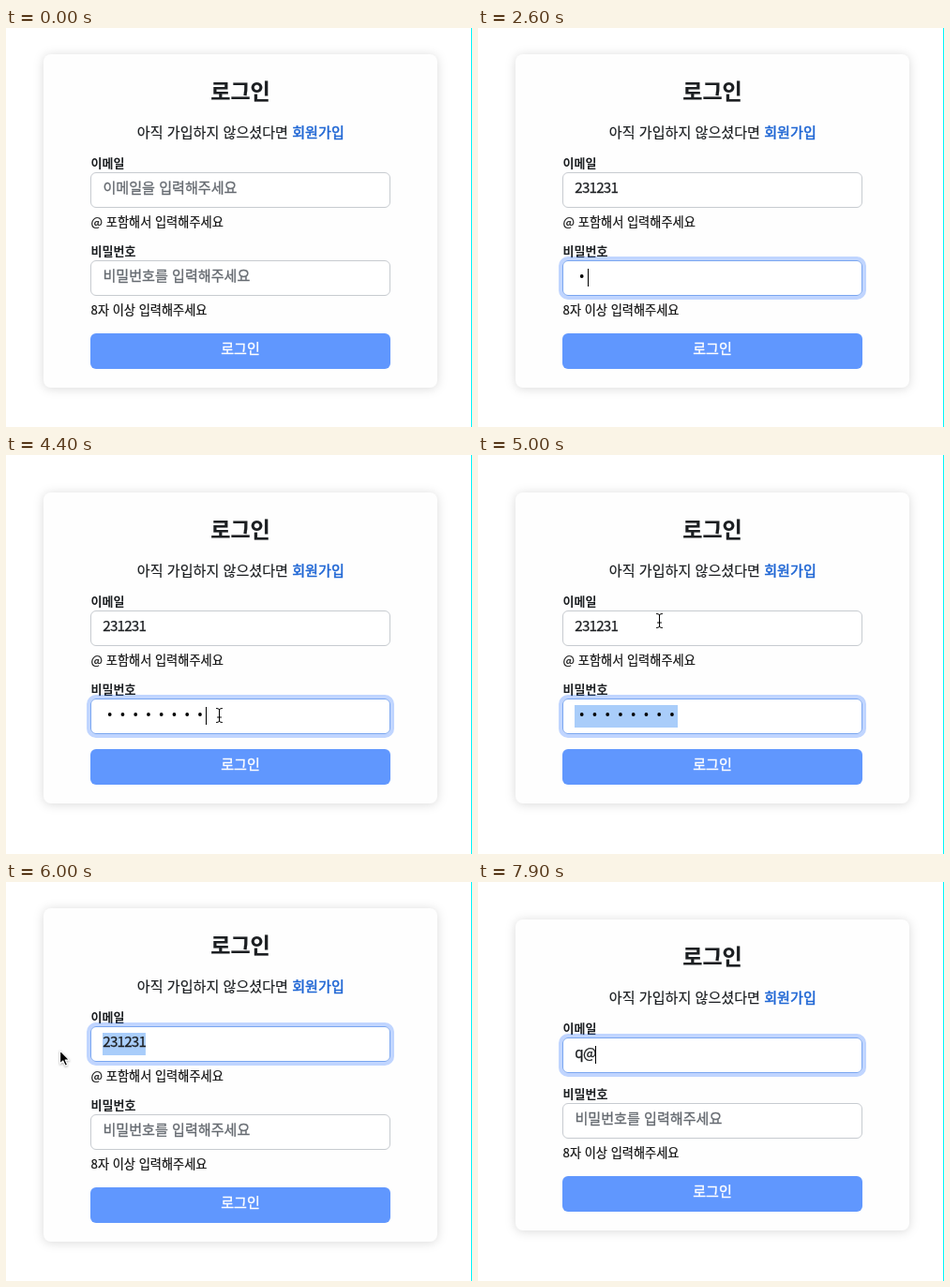
Recreate the animation shown at these times as an HTML page. Size 497x426 px, loop 8000 ms.

```html
<!DOCTYPE html>
<html lang="ko">
<head>
<meta charset="utf-8">
<title>로그인</title>
<style>
  html, body { margin: 0; width: 100%; height: 100%; overflow: hidden; background: #fff; }
  svg { display: block; width: 497px; height: 426px; }
  text { font-family: "Noto Sans CJK KR", "Noto Sans CJK", "Noto Sans", sans-serif; fill: #1c1f22; stroke: #1c1f22; stroke-width: .2px; white-space: pre; }
  .card { fill: #fefefe; filter: drop-shadow(0 1px 5.5px rgba(0, 0, 0, .15)); }
  .title { font-size: 23px; font-weight: 700; }
  .body { font-size: 15.1px; }
  .link { fill: #1f66d4; stroke: #1f66d4; stroke-width: .5px; font-weight: 500; }
  .label { font-size: 13px; font-weight: 600; stroke: none; }
  .hint { font-size: 13.2px; fill: #111; stroke: #111; }
  .holder { font-size: 15.1px; fill: #656a70; stroke: #656a70; stroke-width: .3px; }
  .value { font-size: 15.2px; letter-spacing: -.8px; stroke-width: .25px; }
  .ring { fill: none; stroke: rgb(13, 95, 253); stroke-opacity: .26; stroke-width: 4; }
  .button { fill: #6097fe; }
  .caption { font-size: 15.1px; font-weight: 500; fill: #fff; stroke: #fff; stroke-width: .35px; }
  .mark { fill: #a9cdfa; }
  .caret { fill: #000; }
</style>
</head>
<body>
<svg viewBox="0 0 497 426">
  <rect width="497" height="426" fill="#fff"/>
  <rect id="card" class="card" x="40" width="420" rx="8"/>
  <g id="head">
    <text class="title" x="250" y="75.7" text-anchor="middle">로그인</text>
    <text class="body" x="139.8" y="116.8">아직 가입하지 않으셨다면 <tspan class="link">회원가입</tspan></text>
  </g>
  <g id="email"></g>
  <g id="pass"></g>
  <g id="submit">
    <rect class="button" x="90" y="326" width="320" height="38" rx="6"/>
    <text class="caption" x="250" y="347.8" text-anchor="middle">로그인</text>
  </g>
  <g id="beam" fill="none" stroke-linecap="round">
    <path d="M-3 -7.5Q0 -7.5 0 -6Q0 -7.5 3 -7.5M0 -6V6M-3 7.5Q0 7.5 0 6Q0 7.5 3 7.5M-2 2H2" stroke="#fff" stroke-width="2.4"/>
    <path d="M-3 -7.5Q0 -7.5 0 -6Q0 -7.5 3 -7.5M0 -6V6M-3 7.5Q0 7.5 0 6Q0 7.5 3 7.5M-2 2H2" stroke="#000"/>
  </g>
  <path id="arrow" d="M.6 .8V15L3.8 12L6.2 17.3L8.6 16.2L6.2 11.1H10.6Z" fill="#000" stroke="#fff" stroke-width="1.1"
    stroke-linejoin="round" style="filter:drop-shadow(0 1px 1px rgba(0,0,0,.3))"/>
  <rect x="496" width="1" height="426" fill="#00f6fa"/>
</svg>
<script>
const $ = id => document.getElementById(id);
const LOOP = 8000, STEP = 100, LEFT = 103, DOT = 13.75;
const clamp = (v, lo, hi) => Math.max(lo, Math.min(hi, v));
const mix = (a, b, k) => a + (b - a) * k;
const show = (el, on) => el.setAttribute('display', on ? 'inline' : 'none');
const move = (el, x, y) => el.setAttribute('transform', `translate(${x} ${y})`);
const charWidth = c => c === '@' ? 14 : c === 'q' ? 8 : 7.65;
const textWidth = s => [...s].reduce((w, c) => w + charWidth(c), 0);

// Both fields share the same local coordinates, as if at the email position.
function makeField(id, label, holder, hint) {
  const root = $(id);
  root.innerHTML = `
    <text class="label" x="90.5" y="148.8">${label}</text>
    <rect class="ring" x="88" y="152" width="324" height="42" rx="8"/>
    <rect class="box" x="90.5" y="154.5" width="319" height="37" rx="5.5" fill="#fff"/>
    <rect class="mark" y="161" height="24"/>
    <text class="holder" x="${LEFT + .4}" y="176">${holder}</text>
    <text class="value" x="${LEFT + .3}" y="176.2"></text>
    <g class="dots"></g>
    <rect class="caret" width="1" height="19"/>
    <text class="hint" x="90.6" y="212">${hint}</text>`;
  const part = name => root.querySelector('.' + name);
  const dots = part('dots');
  for (let i = 0; i < 8; i++) dots.innerHTML += `<circle cx="${110.7 + DOT * i}" cy="171" r="1.9"/>`;
  return { root, part, dots };
}

const email = makeField('email', '이메일', '이메일을 입력해주세요', '@ 포함해서 입력해주세요');
const pass = makeField('pass', '비밀번호', '비밀번호를 입력해주세요', '8자 이상 입력해주세요');

function drawField(f, s) {
  const { part } = f;
  move(f.root, 0, s.y);
  part('ring').setAttribute('opacity', s.focus);
  part('box').setAttribute('stroke',
    `rgb(${mix(199, 122, s.focus)},${mix(203, 166, s.focus)},${mix(208, 240, s.focus)})`);
  show(part('holder'), !s.text && !s.dots);
  part('value').textContent = s.text || '';
  [...f.dots.children].forEach((d, i) => show(d, i < (s.dots || 0)));
  show(part('hint'), s.hint);

  const end = LEFT + (s.dots ? s.dots * DOT : textWidth(s.text || ''));
  const from = s.mark == null ? end : s.mark;
  show(part('mark'), from < end);
  part('mark').setAttribute('x', from);
  part('mark').setAttribute('width', Math.max(0, end - from));

  const caret = part('caret');
  show(caret, s.caret && from >= end);
  caret.setAttribute('x', Math.floor(end + .3));
  caret.setAttribute('y', end > LEFT ? 163 : 164);
}

// Pointer stops: time, x, y
const path = [
  [3500, 238, 169], [3600, 237, 222], [3700, 234, 275], [3800, 234, 275],
  [4100, 229, 278], [4400, 227.5, 278], [4500, 152, 277], [4600, 70, 275],
  [4700, 1, 274], [4800, 110, 216], [4900, 202, 170], [5000, 193.5, 177],
  [5700, 193.5, 177], [5800, 140, 178], [5900, 84, 179], [6000, 57, 179]
];

function pointer(t) {
  if (t < path[0][0] || t >= 6900) return null;
  const i = path.findIndex(p => p[0] > t);
  if (i < 0) return path[path.length - 1].slice(1);
  const a = path[i - 1], b = path[i], k = (t - a[0]) / (b[0] - a[0]);
  return [mix(a[1], b[1], k), mix(a[2], b[2], k)];
}

const ease = (t, start) => t < start ? 0 : t < start + STEP ? .6 : 1;

function emailText(t) {
  if (t < 1700) return '';
  if (t < 6900) return '231231'.slice(0, clamp(1 + (t - 1700) / STEP, 1, 6));
  return t < 7900 ? 'q' : 'q@';
}

function dotCount(t) {
  if (t < 2600 || t >= 5500) return 0;
  return t < 3400 ? Math.min(7, 1 + (t - 2600) / STEP) : 8;
}

function draw(now) {
  const t = Math.floor(now % LOOP / STEP) * STEP;
  const text = emailText(t), dots = dotCount(t), at = pointer(t);
  const emailHint = !text.includes('@'), passHint = dots < 8;
  const hidden = !emailHint + !passHint;
  const top = 12 * hidden;
  const passFocus = ease(t, 2400) - ease(t, 5700);
  const emailFocus = ease(t, 700) - passFocus;

  $('card').setAttribute('y', 28 + top);
  $('card').setAttribute('height', 356 - 2 * top);
  move($('head'), 0, top);
  move($('submit'), 0, -top);

  let emailMark = null, passMark = null;
  if (t >= 5800 && t < 6900) emailMark = LEFT + 7.65 * clamp(Math.round((at[0] - LEFT) / 7.65), 0, 6);
  if (t >= 4500 && t < 5500) {
    const x = t < 4700 ? at[0] : 0;
    passMark = LEFT + DOT * clamp(Math.round((x - LEFT) / DOT), 0, 8);
  }
  const inEmail = t >= 700 && t < 2400 || t >= 5700;
  drawField(email, {
    y: top, text, focus: emailFocus, hint: emailHint, mark: emailMark,
    caret: inEmail && !(t >= 1200 && t < 1700) && !(t >= 7400 && t < 7900)
  });
  drawField(pass, {
    y: 94 + top - (emailHint ? 0 : 24), dots, focus: passFocus, hint: passHint, mark: passMark,
    caret: t >= 2400 && t < 5700 && !(t >= 3900 && t < 4400)
  });

  const inside = at && at[0] > 90;
  show($('beam'), inside);
  show($('arrow'), at && !inside);
  if (at) move($(inside ? 'beam' : 'arrow'), at[0], at[1]);
}

let start = null;
function tick(now) {
  if (start === null) start = now;
  draw(Math.max(0, now - start));
  requestAnimationFrame(tick);
}
draw(0);
requestAnimationFrame(tick);
</script>
</body>
</html>
```
